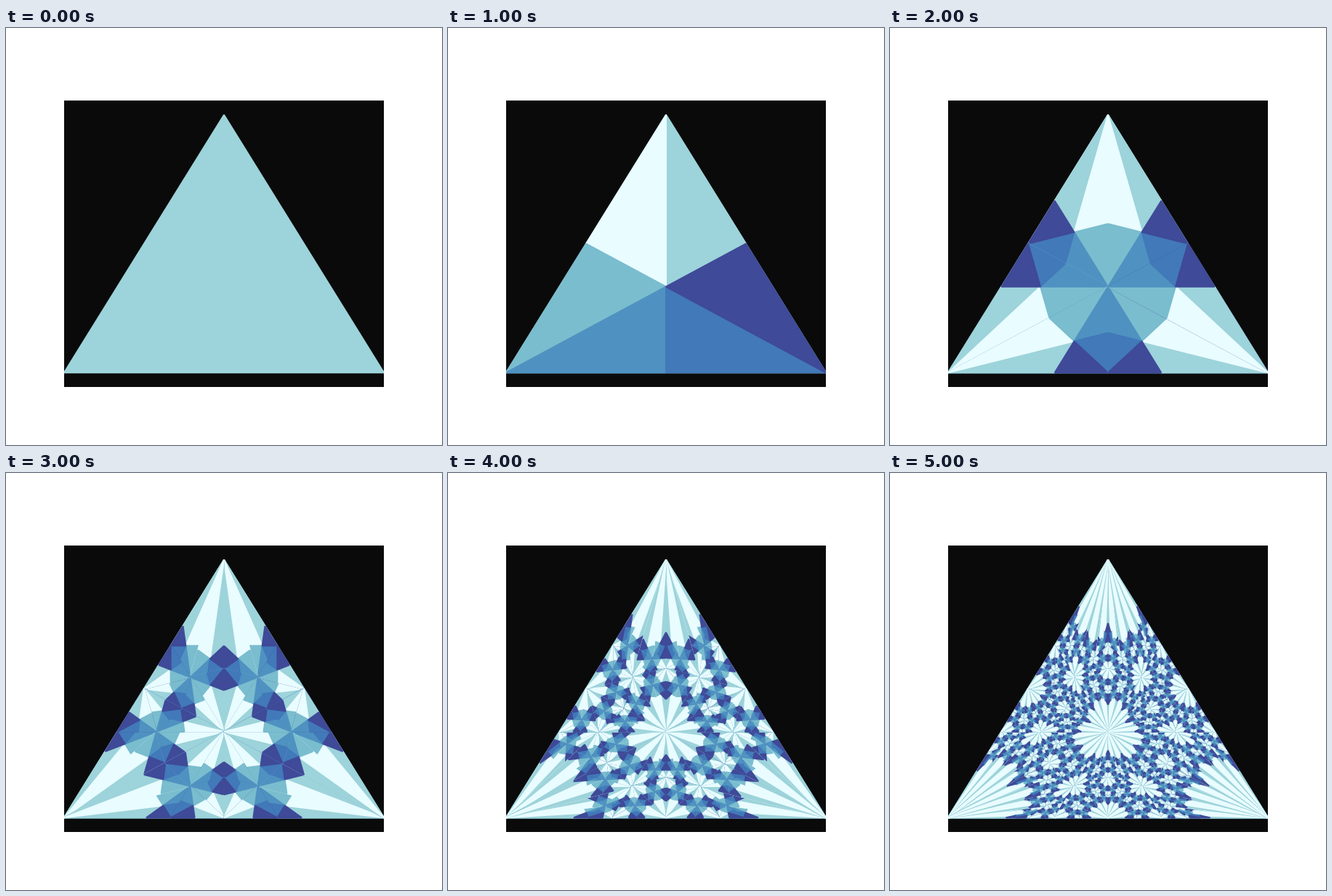
An HTML page with a canvas for the animation above (6 s loop, 600 by 575 pixels).

```html
<!DOCTYPE html>
<html lang="en">
<head>
<meta charset="utf-8">
<title>Triangle subdivision</title>
<style>
html, body { margin: 0; width: 100%; height: 100%; overflow: hidden; background: #fff; }
canvas { display: block; width: 600px; height: 575px; }
</style>
</head>
<body>
<canvas id="stage" width="600" height="575"></canvas>
<script>
const STEP = 1000, LEVELS = 6;
const BOX = { x: 80, y: 100, w: 440, h: 395 };
const LIGHT = '#9dd3da', WHITE = '#e9fcff', TEAL = '#7abdce';
const SKY = '#4f92c1', BLUE = '#4279b9', INDIGO = '#3f4a98';

const ctx = document.getElementById('stage').getContext('2d');
const TALL = Math.sqrt(3) / 2;

// The geometry lives in an equilateral triangle that is squashed on screen.
const toX = p => BOX.x + p[0] * BOX.w;
const toY = p => BOX.y + BOX.h * (0.05 + 0.9 * p[1] / TALL);

const dist = (p, q) => Math.hypot(p[0] - q[0], p[1] - q[1]);
const mix = (p, q, wp, wq) => [0, 1].map(i => (p[i] * wp + q[i] * wq) / (wp + wq));

function paint(a, b, c, color) {
  ctx.beginPath();
  ctx.moveTo(toX(a), toY(a));
  ctx.lineTo(toX(b), toY(b));
  ctx.lineTo(toX(c), toY(c));
  ctx.closePath();
  ctx.fillStyle = ctx.strokeStyle = color;
  ctx.fill();
  ctx.stroke();
}

// Angle bisectors cut each triangle into six around its incentre.
function divide(a, b, c, color, depth) {
  paint(a, b, c, color);
  if (!depth) return;
  const la = dist(b, c), lb = dist(a, c), lc = dist(a, b);
  const ab = mix(a, b, la, lb), bc = mix(b, c, lb, lc), ac = mix(a, c, la, lc);
  const mid = mix(ab, c, la + lb, lc);
  const cut = (corner, foot, tint) => divide(corner, mid, foot, tint, depth - 1);
  cut(a, ac, LIGHT);
  cut(a, ab, WHITE);
  cut(b, ab, TEAL);
  cut(b, bc, SKY);
  cut(c, bc, BLUE);
  cut(c, ac, INDIGO);
}

function draw(depth) {
  ctx.fillStyle = '#fff';
  ctx.fillRect(0, 0, 600, 575);
  ctx.save();
  ctx.beginPath();
  ctx.rect(BOX.x, BOX.y, BOX.w, BOX.h);
  ctx.clip();
  ctx.fillStyle = '#0a0a0a';
  ctx.fillRect(BOX.x, BOX.y, BOX.w, BOX.h);
  ctx.lineWidth = 2;
  ctx.lineJoin = 'bevel';
  divide([0.5, 0], [0, TALL], [1, TALL], LIGHT, depth);
  ctx.restore();
}

let shown = -1;
const start = performance.now();
function tick() {
  const depth = Math.floor((performance.now() - start) / STEP) % LEVELS;
  if (depth !== shown) draw(shown = depth);
  requestAnimationFrame(tick);
}
tick();
</script>
</body>
</html>
```
